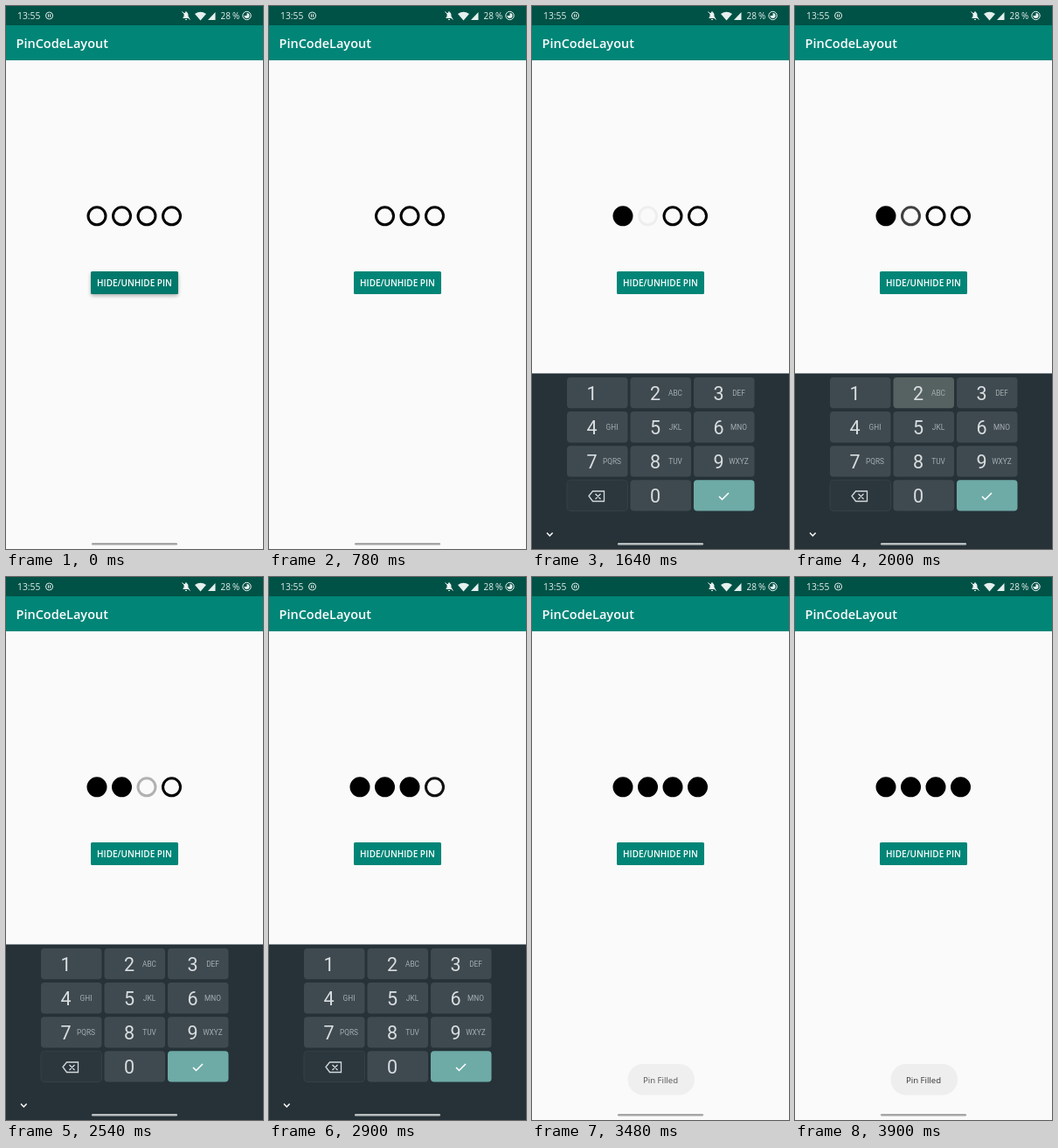
An HTML page for the animation above (4000 ms loop, 294x620 px).

```html
<!DOCTYPE html>
<html lang="en">
<head>
<meta charset="utf-8">
<title>Pin entry</title>
<style>
  html, body { margin: 0; width: 100%; height: 100%; overflow: hidden; background: #fafafa; }
  svg { display: block; width: 294px; height: 620px; font-family: "Open Sans", sans-serif; }
  .mid { text-anchor: middle; }
  .key { font-family: Roboto, sans-serif; text-anchor: middle; }
  .line { fill: none; stroke: #fff; }
</style>
</head>
<body>
<svg viewBox="0 0 294 620">
  <rect width="294" height="620" fill="#fafafa"/>
  <rect width="294" height="62" fill="#008577"/>
  <rect width="294" height="22" fill="#005246"/>

  <g fill="#e6f0ee">
    <text x="13" y="15" font-size="10.3">13:55</text>
    <text x="245.5" y="15" font-size="10">28&#8201;%</text>
    <path d="M216 9Q222.5 4.500 229 9L222.500 16.500Z"/>
    <path d="M239.500 7V16H231Z"/>
    <path d="M202.500 14V13L203.500 12V10Q203.500 7.500 205.500 7V6H206.500V7Q208.500 7.500 208.500 10V12L209.500 13V14ZM205 15H207V16H205Z"/>
    <path d="M275.500 8A3 3 0 1 1 272.500 11H275.500Z"/>
  </g>
  <path d="M201.500 6.500L210.500 15.500" class="line"/>
  <g class="line" stroke-width="1" opacity=".9">
    <circle cx="49.500" cy="11" r="4"/>
    <path d="M48.500 9.300V12.700M50.500 9.300V12.700"/>
    <circle cx="275.500" cy="11" r="4.700"/>
  </g>
  <text x="11.500" y="47.500" font-size="14.500" font-weight="600" fill="#fff">PinCodeLayout</text>

  <g id="rings" stroke="#000" stroke-width="3"></g>

  <rect id="shadow" x="97" y="305" width="100" height="26" rx="2" style="filter:blur(2px)"/>
  <rect x="97" y="303" width="100" height="26" rx="1.500" fill="#008577"/>
  <g id="ripple">
    <rect x="97" y="303" width="100" height="26" rx="1.500" opacity=".6"/>
    <rect x="111" y="303" width="86" height="26" rx="1.500" opacity=".4"/>
  </g>
  <text x="147" y="319.500" class="mid" font-size="10" font-weight="600" fill="#fff">HIDE/UNHIDE PIN</text>

  <g id="toast">
    <rect x="109.500" y="556" width="76.500" height="35.500" rx="17.500" fill="#eee"/>
    <text x="147" y="578" class="mid" font-size="9.600" fill="#333">Pin Filled</text>
  </g>

  <g id="keyboard">
    <rect y="419.500" width="294" height="260" fill="#263238"/>
    <g id="keys"></g>
    <path class="line" stroke-width="1.300" d="M65 559.500L69.500 554H82.500V565.500H69.500ZM72.500 557L78.500 563M78.500 557L72.500 563" style="stroke:#d5dadc"/>
    <path class="line" stroke-width="1.500" d="M214 560L217.500 563.500L225 556"/>
  </g>
  <path id="chevron" class="line" stroke-width="1.500" d="M17 601.500L20.300 605L23.600 601.500"/>
  <rect id="pill" x="98" y="613" width="98" height="2.600" rx="1.300"/>
</svg>

<script>
const LOOP = 4000;
const focusTimes = [780, 1600, 2050, 2650];
const fillTimes = [1600, 2050, 2650, 3080];
const SHOW = 840, HIDE = 3140, SLIDE = 46, BLINK = 300;
const letters = ['', 'ABC', 'DEF', 'GHI', 'JKL', 'MNO', 'PQRS', 'TUV', 'WXYZ', '', '', ''];

const $ = id => document.getElementById(id);
const progress = (t, start, length) => Math.min(1, Math.max(0, (t - start) / length));

function add(parent, tag, attrs, text = '') {
  const el = document.createElementNS('http://www.w3.org/2000/svg', tag);
  for (const name in attrs) el.setAttribute(name, attrs[name]);
  el.textContent = text;
  return parent.appendChild(el);
}

const rings = focusTimes.map((_, i) =>
  add($('rings'), 'circle', { cx: 104 + 28.5 * i, cy: 239.8, r: 10 }));

const keys = letters.map((label, i) => {
  const x = 40 + 72.5 * (i % 3), y = 424 + 39.1 * Math.floor(i / 3);
  const fill = i === 9 ? '#2b363d' : i === 11 ? '#6eaba7' : '#3f4a50';
  const key = add($('keys'), 'rect', { x, y, width: 69.5, height: 35.3, rx: 4, fill });
  if (i === 9) key.setAttribute('stroke', '#344047');
  const digit = i < 9 ? i + 1 : i === 10 ? 0 : '';
  add($('keys'), 'text', { class: 'key', x: x + 28.5, y: y + 25.5, 'font-size': 21.5, fill: '#d8dddf' }, digit);
  add($('keys'), 'text', { class: 'key', x: x + 51.5, y: y + 20.5, 'font-size': 8.3, fill: '#a3adb1' }, label);
  return key;
});

function draw(t) {
  const press = 1 - progress(t, 0, 160);
  $('ripple').setAttribute('opacity', 0.13 * press);
  $('shadow').setAttribute('opacity', 0.3 * press);

  rings.forEach((ring, i) => {
    const filled = t >= fillTimes[i];
    const blinking = t >= focusTimes[i] && !filled;
    const wave = (1 - Math.cos(Math.PI * (t - focusTimes[i]) / BLINK)) / 2;
    ring.setAttribute('fill', filled ? '#000' : 'none');
    ring.setAttribute('opacity', blinking ? wave : 1);
  });

  fillTimes.forEach((time, i) =>
    keys[i].setAttribute('fill', t >= time - 90 && t < time + 20 ? '#566261' : '#3f4a50'));

  const enter = 1 - (1 - progress(t, SHOW, 200)) ** 2;
  const visible = enter * (1 - progress(t, HIDE, 210));
  $('keyboard').setAttribute('opacity', visible);
  $('keyboard').setAttribute('transform', `translate(0 ${SLIDE * (1 - visible)})`);
  $('chevron').setAttribute('opacity', enter === 1 && t < HIDE ? 1 : 0);
  $('pill').setAttribute('fill', visible > 0.5 ? '#b9bec0' : '#a6a6a6');
  $('toast').setAttribute('opacity', progress(t, 3280, 240));
}

const start = performance.now();
(function tick() {
  draw((performance.now() - start) % LOOP);
  requestAnimationFrame(tick);
})();
</script>
</body>
</html>
```
